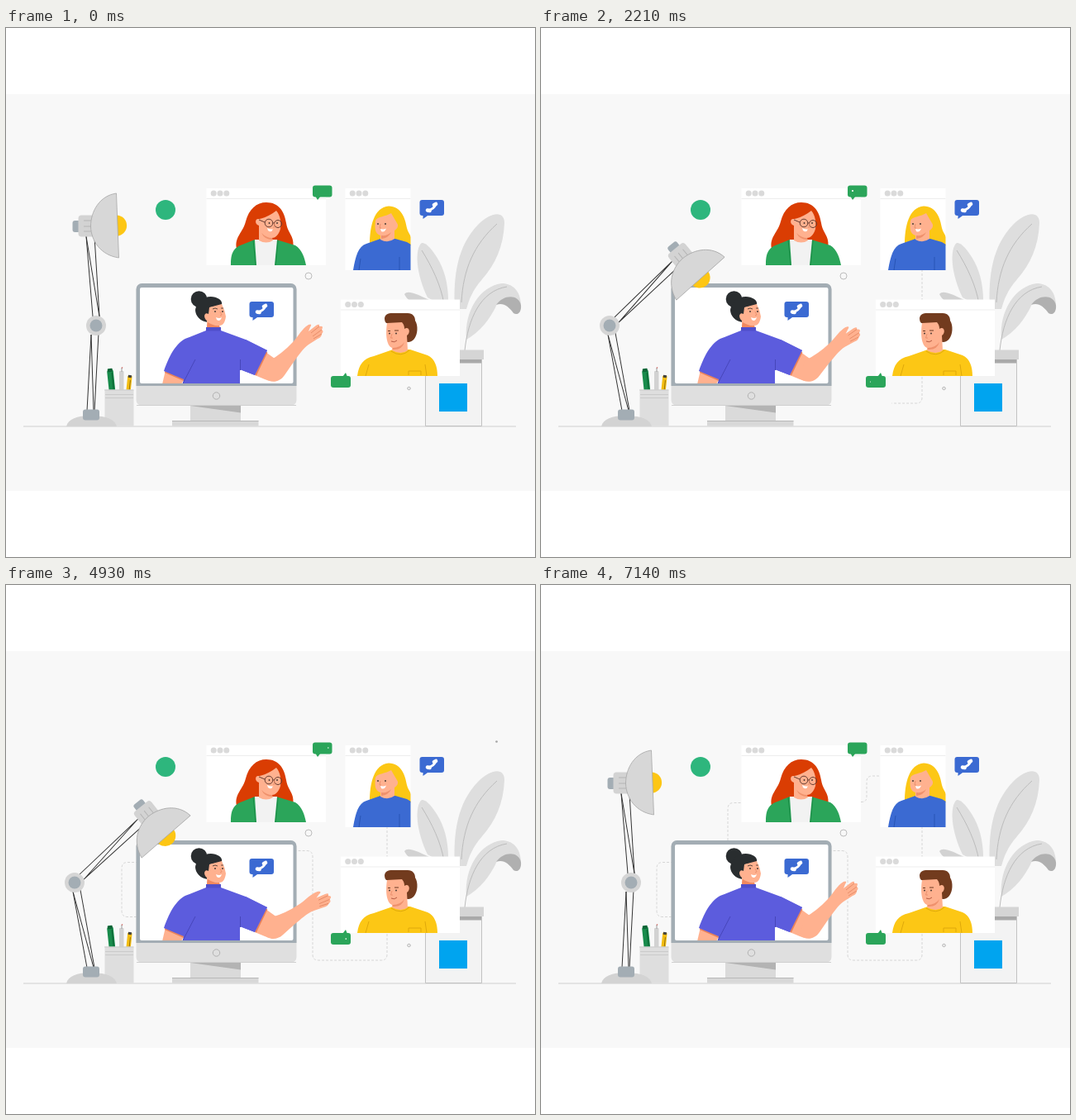
An HTML page with a canvas that plays this animation: 640x640 px, repeating every 7.21 s.

```html
<!DOCTYPE html>
<html lang="en">
<head>
<meta charset="utf-8">
<title>Remote team call</title>
<style>
html, body { margin: 0; width: 100%; height: 100%; overflow: hidden; background: #fff; }
canvas { display: block; width: 640px; height: 640px; }
</style>
</head>
<body>
<canvas id="stage" width="640" height="640"></canvas>
<script>
const ctx = document.getElementById('stage').getContext('2d');
const LOOP = 7210, STEP = LOOP / 101;
const SKIN = '#ffb18f', SKIN_LINE = '#e58a66', STEEL = '#a3adb4', GREY = '#dedede';
const BLUE = '#3b6ad2', GREEN = '#2ba55a', YELLOW = '#fcc715', PURPLE = '#5c5cdd';

// ---- drawing helpers ----
function fill(d, color) {
  ctx.fillStyle = color;
  ctx.fill(new Path2D(d));
}
function line(d, color, width = 1) {
  ctx.strokeStyle = color;
  ctx.lineWidth = width;
  ctx.stroke(new Path2D(d));
}
function box(x, y, w, h, color, r = 0) {
  ctx.fillStyle = color;
  ctx.beginPath();
  ctx.roundRect(x, y, w, h, r);
  ctx.fill();
}
function dot(x, y, r, color) {
  if (r <= 0) return;
  ctx.fillStyle = color;
  ctx.beginPath();
  ctx.arc(x, y, r, 0, Math.PI * 2);
  ctx.fill();
}
function ring(x, y, r, color, width = 1) {
  ctx.strokeStyle = color;
  ctx.lineWidth = width;
  ctx.beginPath();
  ctx.arc(x, y, r, 0, Math.PI * 2);
  ctx.stroke();
}
function clipped(x, y, w, h, draw) {
  ctx.save();
  ctx.beginPath();
  ctx.rect(x, y, w, h);
  ctx.clip();
  draw();
  ctx.restore();
}
function turned(x, y, degrees, draw) {
  ctx.save();
  ctx.translate(x, y);
  ctx.rotate(degrees * Math.PI / 180);
  draw();
  ctx.restore();
}

// ---- motion helpers ----
const clamp = v => Math.max(0, Math.min(1, v));
const ease = v => (1 - Math.cos(Math.PI * clamp(v))) / 2;

// Smooth curve through keys, flat at each turning point.
function curve(keys, t) {
  const rate = i => (keys[i + 1][1] - keys[i][1]) / (keys[i + 1][0] - keys[i][0]);
  const slope = i => {
    if (i === 0 || i === keys.length - 1) return 0;
    const a = rate(i - 1), b = rate(i);
    return a * b <= 0 ? 0 : 2 * a * b / (a + b);
  };
  let i = 0;
  while (i < keys.length - 2 && t > keys[i + 1][0]) i++;
  const [t0, v0] = keys[i], [t1, v1] = keys[i + 1];
  const h = t1 - t0, u = clamp((t - t0) / h), w = 1 - u;
  return v0 * (1 + 2 * u) * w * w + v1 * u * u * (3 - 2 * u)
    + h * u * w * (slope(i) * w - slope(i + 1) * u);
}

// ---- dashed connection ----
const LINKS = [
  [1430, 'M461 292V447Q461 454 454 454H378Q371 454 371 447V329Q371 321.500 364 321.500H350'],
  [4050, 'M158 401.500H147Q140 401.500 140 394V343Q140 335.500 147 335.500H158'],
  [5250, 'M226 309V271Q226 263.500 233 263.500H243'],
  [6350, 'M387 262.500H388Q394 262.500 394 256V238Q394 231 401 231H411']
];
function links(t) {
  for (const [start, d] of LINKS) {
    const length = Math.min(500, (t - start) * 0.25);
    if (length <= 0) continue;
    const dashes = [];
    for (let at = 0; at < length; at += 5) dashes.push(Math.min(3, length - at), 2);
    dashes.push(0, 9999);
    ctx.setLineDash(dashes);
    line(d, '#d6d6d6');
  }
  ctx.setLineDash([]);
}

// ---- floating dots ----
function floaters(t) {
  const pulse = (start, size) => size * Math.sin(Math.PI * clamp((t % 2400 - start) / 900));
  dot(593.500, 189.500, pulse(0, 3.200), '#a5a5a5');
  dot(118.500, 367, pulse(400, 4.200), '#a5a9ac');
  dot(361, 466, pulse(1100, 3.100), '#9aa5ac');
  ring(366, 300, 4, '#bdbdbd');
  ring(487.500, 436, 1.700, '#b0b0b0');
}

// ---- plant ----
function plant() {
  fill('M482 322C486 317 495 321 512 329L490 331Q484 327 482 322Z', '#d2d2d2');
  fill('M503 260C494 267 496 298 510 326L535 340C536 315 532 297 524 282C516 268 508 259 503 260Z', GREY);
  fill('M543 340C541 300 546 264 571 238C589 221 603 222 603 236C602 264 592 286 576 304C564 318 561 327 557 340Z', GREY);
  fill('M557 377C554 342 574 312 600 309C613 309 622 318 623 334L594 334C586 352 573 368 557 377Z', GREY);
  fill('M593 335C602 322 620 322 623 335C624 345 618 348 614 345C608 337 602 332 593 335Z', '#b0b0b0');
  line('M503 269C516 290 526 311 530 334M594 237C566 262 553 292 551 332M606 313C574 318 559 352 555 390', '#bcbcbc');
  box(505, 389.500, 73, 11.500, '#d5d5d5');
  box(507.500, 401, 68, 80, '#f3f3f3');
  box(507, 401, 69, 4.500, '#a9a9a9');
  line('M507.500 401V481.500H575.500V401', '#c2c2c2');
  box(524, 430, 34, 34, '#00a4ef');
}

// ---- video windows ----
function panel(x, y, w, h) {
  box(x, y, w, h, '#fff');
  line(`M${x} ${y + 12.500}h${w}`, '#ededed');
  for (let i = 0; i < 3; i++) dot(x + 8.700 + i * 7.800, y + 6, 3.500, '#dadada');
}
function eyes(x1, x2, y) {
  dot(x1, y, 0.900, '#38302e');
  dot(x2, y, 0.900, '#38302e');
}
function redhead() {
  fill('M279 267C276 253 287 247 290 234C294 219 303 211 315 211C330 211 337 222 339 236C341 249 350 252 347 267Z', '#da3d03');
  fill('M272 287C272 272 275 266 286 262L301 256H327L350 263C358 268 361 277 363 287Z', GREEN);
  fill('M301 256L303 287H325L328 256Z', '#f2f2f2');
  fill('M307 231C315 229 322 225 327 221C332 227 333 235 332 243C330 251 325 254 322 254L323 257Q315 262 306 257V239C301 238 301 231 305 231Z', SKIN);
  fill('M309 248Q315 254 322 254L322 256Q313 256 309 248Z', '#ef916c');
  line('M299 257Q301 273 302 287M329 257L326 287', '#15843f', 0.800);
  ring(318, 236, 4.800, '#643c32');
  ring(329, 237, 4.500, '#643c32');
  line('M313 235L306 232M322.700 236H324.600', '#643c32');
  eyes(318.500, 328, 236);
  line('M324 236L325.500 241L323 241', SKIN_LINE, 0.800);
  fill('M316 242Q320 244 323 243.500Q321 248 317 245Z', '#fff');
}
function blonde() {
  fill('M440 263C440 240 445 217 463 215.500C478 215.500 483 230 485 242C487 250 492 252 492 263Z', YELLOW);
  fill('M420 293C423 276 426 264 436 261L453 255H471L485 259L490 262V293Z', BLUE);
  fill('M447 233C449 228 460 228 466 224Q470 231 473 236C476 240 472 244 470 245V255Q462 261 453 256V251C446 249 446 242 447 233Z', SKIN);
  fill('M454 251Q461 252 466 247Q463 254 454 255Z', '#ef916c');
  line('M429 279L427 293M476 277V293', '#2854b5');
  eyes(450, 459, 237);
  line('M453 237L452 242H454', SKIN_LINE, 0.800);
  fill('M453 243Q457 244 460 242.500Q458 248 454 246Z', '#fff');
}
function man() {
  fill('M425 421C427 407 432 400 445 397L468 389H489L510 396C519 400 522 410 522 421Z', YELLOW);
  fill('M458 352C458 346 463 344.500 470 345H486C492 345 495 349 495 354C499 360 498 371 494 376C491 380 486 381 483 379L480 358L460 357Q458 355 458 352Z', '#723b1e');
  fill('M461 357L479 356Q482 359 482 364C488 360 490 369 485 372L486 390Q478 396 467 390V387C460 384 459 370 461 357Z', SKIN);
  fill('M468 387Q477 387 482 380Q479 390 468 389Z', '#ef916c');
  line('M466 391Q478 399 488 390', '#dfa80b');
  line('M439 407L435 421M507 407L509 421M487 420V415H502V420', '#dfa80b');
  eyes(464, 472, 369.500);
  line('M462 366.500H465M470 366H475', '#6b3b25');
  line('M467 370L465.500 375H468', SKIN_LINE, 0.800);
  line('M466 379Q470 381 473 378', '#b65a43');
}
function panels() {
  panel(242.500, 194, 144.500, 93);
  clipped(242, 194, 145, 93, redhead);
  panel(410.500, 194, 79, 99);
  clipped(410, 194, 79.500, 99, blonde);
  panel(405, 328.500, 144, 92.500);
  clipped(405, 328, 144, 93, man);
}

// ---- monitor and host ----
function monitor() {
  box(223, 457, 61, 18, '#dadada');
  fill('M223 457H284V465.500Z', '#b3b3b3');
  box(201, 475, 104.500, 6.500, '#d8d8d8');
  line('M201 475.500H305.500', '#b8b8b8');
  box(157.500, 309, 194, 148, '#dfdfdf', 7);
  box(157.500, 309, 194, 124, STEEL, [7, 7, 0, 0]);
  box(162, 314, 185.500, 116, '#fff', 2);
  line('M158 456.500H351', '#cfcfcf');
  ring(254.500, 445, 4.200, '#b1b1b1');
}
function host(t) {
  clipped(162, 314, 185, 116, () => {
    fill('M193 414L216 424L212 431H189Z', SKIN);
    fill('M193 414L216 425L215 427L192 417Z', '#e9825a');
    fill('M191 415C198 395 207 378 222 374L242 366V362H260V366L290 377L316 390L301 420L283 413V430H214L215 425Z', PURPLE);
    line('M229 401L214 430M283.500 401V414', '#4746ba');
    dot(233.500, 328, 9.800, '#292d2f');
    fill('M229 341C231 326 248 321 258 328Q262 331 261 335L247 338L244 356C235 355 229 348 229 341Z', '#292d2f');
    fill('M246 338L261 334Q265 342 266 349C265 357 262 360 258 360L260 363H243V354C238 350 240 343 245 346Z', SKIN);
    fill('M244 356Q252 361 258 360V362H243Z', '#f0885f');
    box(242, 362, 18, 4.500, '#504fcb');
    eyes(253, 262, 343);
    line('M250 340Q253 338 256 340M260 339H263', '#3a302d', 0.800);
    line('M259 343L261 347L259 348', SKIN_LINE, 0.800);
    fill('M254 350Q258 352 261 350Q259 356 255 353Z', '#fff');
  });

  const wave = t < 480 || t > 6880 ? 0 : 7 * (1 - Math.cos((t - 480) / 800 * Math.PI * 2));
  fill('M314 392L328 402L334 419Q326 431 313 425L301 420Z', SKIN);
  turned(322, 413, wave, () => {
    ctx.translate(-322, -413);
    fill('M318 403Q334 394 347 380C353 374 356 367 363 361C368 357 371 358 368 362L366 367L375 360Q380 357 379 361Q385 360 382 365Q385 367 382 370Q382 374 377 376L366 383C359 388 354 396 348 404L337 420C331 429 320 430 314 424Z', SKIN);
    line('M379 361L369 369M382 365L371 373M382 370L372 376', SKIN_LINE, 0.900);
  });
  line('M315.500 392L302 420', '#e9825a', 2);
  fill('M290 377L316 390L301 420L283 413V385Z', PURPLE);
  line('M283.500 401V414', '#4746ba');
}

// ---- chat bubbles ----
function callBubble(x, y) {
  box(x, y, 29.500, 19, BLUE, 3);
  fill(`M${x + 4} ${y + 17}v6l7 -5z`, BLUE);
  ctx.lineCap = 'round';
  line(`M${x + 10} ${y + 13}Q${x + 17} ${y + 11} ${x + 19} ${y + 6}`, '#fff', 3);
  line(`M${x + 9.500} ${y + 12.500}l2.500 .500M${x + 17.500} ${y + 6}l2 -1`, '#fff', 4.600);
  ctx.lineCap = 'butt';
}
const TYPING = [[0.24, 0.34, 0.67], [0.28, 0.42, 0.86], [0.36, 0.56, 1.03]];
function typing(x, y, t) {
  const p = Math.max(0, t) / 1717 % 1;
  TYPING.forEach(([start, peak, end], i) => {
    const size = p < peak ? (p - start) / (peak - start) : (end - p) / (end - peak);
    dot(x + i * 6.400, y, 2.200 * clamp(size), '#fff');
  });
}
function bubbles(t) {
  callBubble(294.500, 331);
  callBubble(500.500, 208);
  box(371, 190.500, 23.500, 14, GREEN, 3);
  fill('M374 203L377 208L381 203Z', GREEN);
  typing(377, 197, t);
  box(393, 421, 24, 14, GREEN, 3);
  fill('M407 422L411 417L413 422Z', GREEN);
  typing(398.500, 428, t - 40);
}

// ---- desk items ----
function penCup() {
  turned(127, 425, -6, () => {
    box(-3.800, -11, 7.600, 25, '#188b4b', 1.500);
    box(-3, -13, 6, 4, '#0d6536', 1);
    line('M2 -8V12', '#0b6233', 1.200);
  });
  box(137, 415, 5.500, 24, '#d2d2d2', 1);
  line('M140 416V411', '#a9a9a9', 1.200);
  dot(140.500, 411, 0.800, '#d05a53');
  turned(149, 430, 6, () => {
    box(-2.700, -9, 5.400, 20, '#f3bd12');
    box(-2, -10, 4, 3, '#44433e');
    line('M1 -4V9', '#947310');
  });
  box(119.500, 437.500, 35, 44, GREY);
  line('M119 438H154.500M120 443.500H154M120 447.500H154', '#c6c6c6', 0.800);
}
const LAMP_KEYS = [[0, 0], [710, 41], [1570, 59], [2860, 42], [4070, 53], [5860, 46], [7140, 0]];
function lamp(t) {
  const lean = ease(t / 700) - ease((t - 5600) / 1540);
  const x = 109 - 26 * lean, y = 360;
  const left = x - 6 + 4 * lean, right = x + 3 + 4 * lean;
  fill('M73 482C75 473 86 469 102 469C118 469 131 472 134 482Z', '#d3d3d3');
  line(`M98 463L${left} ${y + 11}L106 463M107 463L${right} ${y + 9}`, '#333');
  box(93, 461.500, 20, 13, STEEL, 3);

  turned(x, y, curve(LAMP_KEYS, t), () => {
    ctx.translate(-109, -360);
    line('M105 349L97 252M113 349L97 252M113 349L107 252', '#333');
    dot(133.500, 239, 12.600, '#fdc614');
    box(80.500, 233, 10, 14, STEEL, 3);
    box(87.500, 226.500, 20, 26, '#d3d3d3', 4);
    line('M94 233H103M94 240H103M94 246H103', '#b5b5b5');
    const shade = 'M133.500 200C113 203 102.500 222 102.500 240C103 258 115 275 136.500 278Z';
    fill(shade, '#d7d7d7');
    line(shade, '#a8a8a8', 0.800);
  });
  dot(x, y, 12, '#d5d5d5');
  dot(x, y, 7.500, STEEL);
}

function scene(t) {
  box(0, 0, 640, 640, '#fff');
  box(0, 80, 640, 480, '#f8f8f8');
  line('M21 482H617', '#cfcfcf');
  links(t);
  plant();
  panels();
  floaters(t);
  monitor();
  host(t);
  bubbles(t);
  dot(193, 220, 12, '#2eb67d');
  penCup();
  lamp(t);
}

const begin = performance.now();
function tick() {
  const t = (performance.now() - begin) % LOOP;
  scene(Math.floor((t + 5) / STEP) % 101 * STEP);
  requestAnimationFrame(tick);
}
tick();
</script>
</body>
</html>
```
